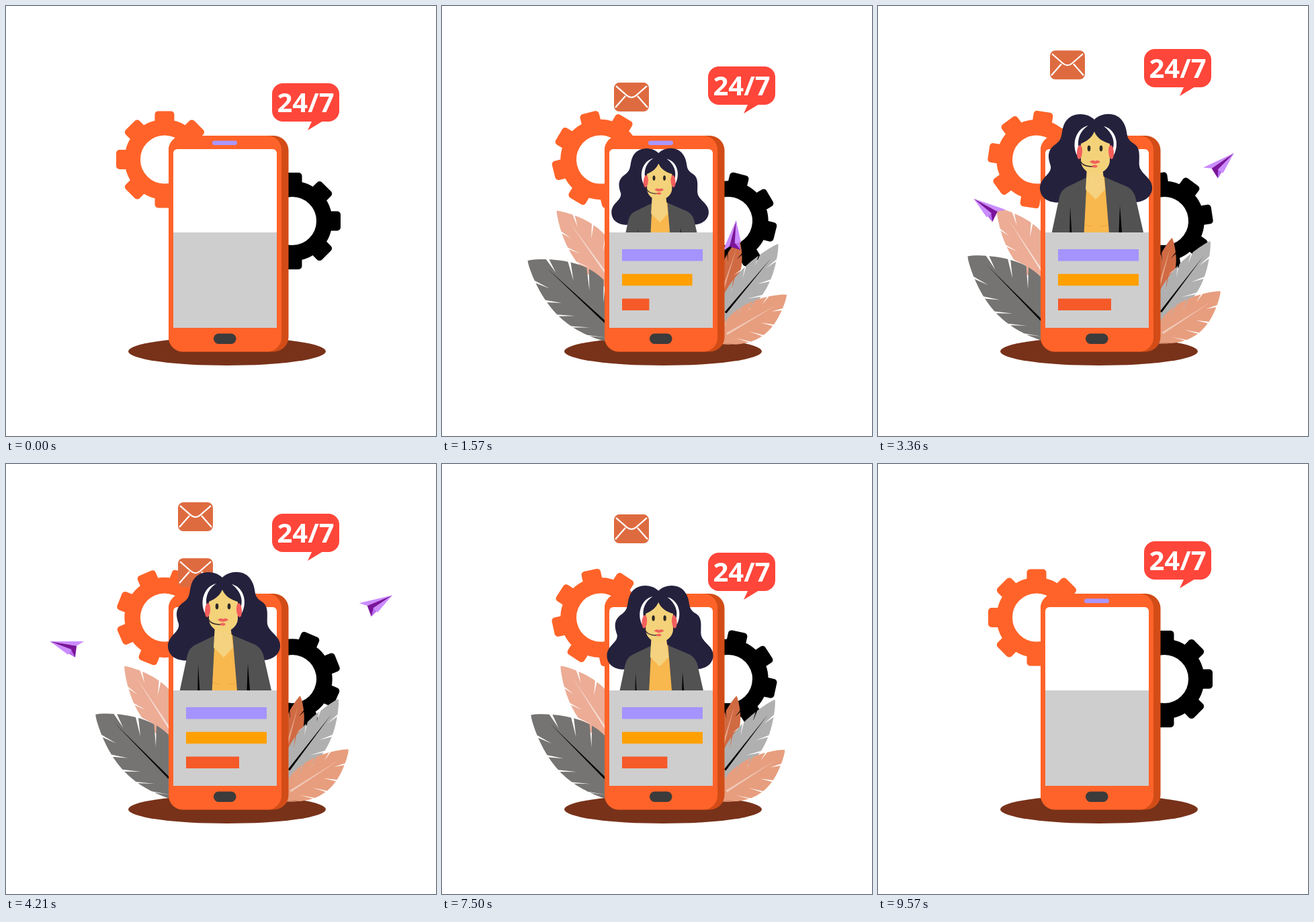
An HTML page with a canvas for the animation above (9.64 s loop, 640 px wide and 640 px high).

```html
<!DOCTYPE html>
<html lang="en">
<head>
<meta charset="utf-8">
<title>Support around the clock</title>
<style>
html, body { margin: 0; width: 100%; height: 100%; overflow: hidden; background: #fff; }
canvas { display: block; }
</style>
</head>
<body>
<canvas id="stage" width="640" height="640"></canvas>
<script>
const ctx = document.getElementById('stage').getContext('2d');
const LOOP = 9640, SPIN = 9570;
const ORANGE = '#ff6329', HAIR = '#24213d', SKIN = '#f3d27a', PINK = '#f35f5c';

const clamp = v => Math.max(0, Math.min(1, v));
const wave = u => (1 - Math.cos(Math.PI * clamp(u))) / 2;

// Smooth curve through [time, value] keys.
function track(t, keys) {
  const n = keys.length - 1;
  if (t <= keys[0][0]) return keys[0][1];
  if (t >= keys[n][0]) return keys[n][1];
  let i = 0;
  while (t > keys[i + 1][0]) i++;
  const slope = k => {
    const a = keys[Math.max(0, k - 1)], b = keys[Math.min(n, k + 1)];
    return (b[1] - a[1]) / (b[0] - a[0]);
  };
  const [t0, a] = keys[i], [t1, b] = keys[i + 1];
  const d = t1 - t0, u = (t - t0) / d, v = 1 - u;
  return v * v * (1 + 2 * u) * a + u * u * (3 - 2 * u) * b
    + u * v * d * (v * slope(i) - u * slope(i + 1));
}

function fill(color, path) {
  ctx.fillStyle = color;
  ctx.fill(typeof path === 'string' ? new Path2D(path) : path);
}
function stroke(color, width, path) {
  ctx.strokeStyle = color;
  ctx.lineWidth = width;
  ctx.stroke(new Path2D(path));
}
function box(color, x, y, w, h, r = 0) {
  const p = new Path2D();
  p.roundRect(x, y, w, h, r);
  fill(color, p);
}
function oval(color, x, y, rx, ry, turn = 0) {
  const p = new Path2D();
  p.ellipse(x, y, rx, ry, turn, 0, 7);
  fill(color, p);
}
function at(x, y, angle, draw) {
  ctx.save();
  ctx.translate(x, y);
  ctx.rotate(angle);
  draw();
  ctx.restore();
}
const rad = deg => deg * Math.PI / 180;

function gear(color, x, y, angle) {
  at(x, y, angle, () => {
    for (let i = 0; i < 8; i++) {
      box(color, -14.5, -72, 29, 20, 5);
      ctx.rotate(Math.PI / 4);
    }
    ctx.strokeStyle = color;
    ctx.lineWidth = 23.5;
    ctx.beginPath();
    ctx.arc(0, 0, 47.75, 0, 7);
    ctx.stroke();
  });
}

// Blade with slits along both edges; wide/narrow are the two half widths.
function leaf({ base, tip, wide, narrow, color, vein, ribs, off, lag = 0 }, t) {
  const time = t > 5000 ? t - lag : t;
  const turn = track(time, LEAF_TURN);
  if (turn >= 80) return;
  const dx = tip[0] - base[0], dy = tip[1] - base[1], len = Math.hypot(dx, dy);
  const inward = dx < 0 ? 1 : -1;
  at(base[0], base[1], Math.atan2(dy, dx) + inward * rad(turn), () => {
    const edge = (u, w) => [len * (1 - u), w * Math.sin(Math.PI * clamp(u)) ** 0.85];
    const p = new Path2D();
    const side = (w, shift) => {
      const slits = Array.from({ length: ribs }, (_, k) => (k + 0.8 + shift) / (ribs + 1));
      const pts = [];
      for (let u = 0; u <= 1.001; u += 0.02) {
        const hit = slits.find(s => s >= u && s < u + 0.02);
        pts.push(edge(u, w));
        if (hit) {
          const [x, y] = edge(hit + 0.04, w);
          pts.push([x - len * 0.07, y * 0.5], edge(u + 0.019, w));
        }
      }
      return pts;
    };
    const outline = [...side(wide, 0), ...side(-narrow, 0.3).reverse()];
    outline.forEach(q => p.lineTo(...q));
    p.closePath();
    fill(color, p);
    fill(vein, `M${len * 0.85} ${off} L${len * 0.2} ${off * 0.5 - 1.6} V${off * 0.5 + 1.6}Z`);
  });
}

const LEAF_TURN = [[200, 85], [600, 28], [1000, 5], [1350, -3.6], [1600, -2.2], [2050, 0],
  [7300, 0], [8000, 2], [9000, 28], [9570, 75], [9640, 85]];
const LEAVES = [
  { base: [265, 430], tip: [176, 301], wide: 36, narrow: 22, color: '#ecac95', vein: '#f6ddd4', ribs: 5, off: 5, lag: -350 },
  { base: [275, 505], tip: [133, 373], wide: 52, narrow: 33, color: '#757472', vein: '#000', ribs: 6, off: 10 },
  { base: [412, 440], tip: [438, 345], wide: 17, narrow: 12, color: '#d06a43', vein: '#e7a588', ribs: 3, off: 1 },
  { base: [400, 480], tip: [495, 350], wide: 29, narrow: 19, color: '#b0b0b0', vein: '#000', ribs: 5, off: 5 },
  { base: [400, 500], tip: [510, 425], wide: 33, narrow: 20, color: '#e79e7e', vein: '#f0c9b9', ribs: 5, off: 5 }
];

function plane(t, { x, y, pitch, start, mirror }) {
  if (t < start || t > 5150) return;
  ctx.save();
  ctx.globalAlpha = 1 - clamp((t - 4900) / 220);
  ctx.translate(track(t, x), track(t, y));
  ctx.scale(mirror, 1);
  ctx.rotate(rad(track(t, pitch)));
  fill('#cb8cff', 'M-28 -12 L21 0 L-19 -3Z');
  fill('#7a1599', 'M-19 -3 L21 0 L-21 14Z');
  fill('#b76df2', 'M-13 5 L21 0 L-21 14Z');
  fill('#cb8cff', 'M-13 4 L21 0 L-10 13Z');
  ctx.restore();
}
const PLANES = [
  { start: 1150, mirror: 1,
    x: [[1150, 428], [1570, 434], [2430, 467], [4000, 546], [4210, 556], [5000, 582]],
    y: [[1150, 385], [1570, 340], [2430, 271], [4000, 210], [4210, 205], [5000, 193]],
    pitch: [[1570, -80], [2430, -60], [3300, -40], [4210, -27], [5000, -20]] },
  { start: 1900, mirror: -1,
    x: [[1900, 255], [2430, 233.5], [3000, 190], [4000, 106], [4210, 86], [4800, 47], [5150, 45]],
    y: [[1900, 408], [2430, 365.5], [3000, 316], [4000, 274], [4210, 269], [5000, 261]],
    pitch: [[1900, -70], [2430, -60], [3000, -42], [4210, -14], [5000, -5]] }
];

function envelope(t, start) {
  const s = (t - start) / 1000;
  if (s < 0 || s > 3) return;
  ctx.save();
  ctx.globalAlpha = clamp(s / 0.4);
  ctx.translate(256, 10 + 92 * (Math.hypot(s, 0.45) - 0.45));
  box('#de6b40', 0, 0, 52, 43, 8);
  stroke('#fff', 2.2, 'M3 5 L19 19 Q26 25 33 19 L49 5 M2 37 L17 20 M50 37 L35 20');
  ctx.restore();
}

function phone() {
  box('#d24c17', 242, 193, 178.5, 321.5, 22);
  box(ORANGE, 242, 193, 168, 321.5, 21);
  box('#a996ff', 307, 200.5, 37, 6.5, 3);
  box('#fff', 249, 213, 154, 130, [6, 6, 0, 0]);
  box('#cecece', 249, 337, 154, 142);
  box('#3b3b3b', 309, 487.5, 33.5, 15.5, 7.5);
}

const BAR_GROW = [[0, 0], [300, 0.51], [500, 0.87], [700, 1], [1000, 1.11], [1160, 1.1],
  [1360, 1.05], [1560, 1.02], [1900, 1]];
function bar(t, color, y, width, start, end) {
  const w = width * track(t - start, BAR_GROW) * (1 - wave((t - end) / 1000));
  if (w > 0) box(color, 268, y, w, 17.5);
}

function agent(t) {
  const scale = t < 5000
    ? 1 - (1 - clamp((t - 230) / 2750)) ** 3
    : 1 - clamp((t - 6467) / 2750) ** 3;
  if (scale < 0.5) return;
  ctx.save();
  ctx.beginPath();
  ctx.rect(0, 0, 640, 337);
  ctx.clip();
  ctx.translate(325, 540);
  ctx.scale(scale, scale);
  ctx.translate(-325, -540);

  fill(HAIR, `M322 169 C311 158 287 157 278 174 C271 188 277 197 264 206
    C251 215 253 226 257 238 C259 250 243 254 241 269 C240 289 260 297 284 290
    L325 278 L352 285 C368 296 404 297 408 273 C410 256 391 251 389 238
    C388 226 392 212 381 205 C366 196 374 188 365 173 C356 157 333 158 322 169Z`);
  fill('#525252', `M311 255 L282 269 Q273 273 270 284 L256 350 H398 L383 284
    Q380 274 371 269 L338 255Z`);
  fill('#f9b84e', 'M311 254 L306 350 H345 L337 254Z');
  fill('#f5d27f', 'M311 240 H334 L338 273 L324 288 L309 273Z');
  stroke('#efa93f', 1.2, 'M308 325 Q314 329 320 327 M331 327 Q337 329 342 325');
  fill('#000', 'M286 298 L289 350 H285Z M360 297 L364 350 H358Z');

  fill(SKIN, `M322 187 C316 200 307 202 302 205 L302 230 C302 242 313 250 323 250
    C334 250 345 241 345 230 L345 205 C335 202 326 197 322 187Z`);
  oval('#2d2926', 314, 212, 2.3, 4.4);
  oval('#2d2926', 332, 212, 2.3, 4.4);
  fill('#ef625b', 'M315 232 Q320 228 323 231 Q327 228 331 232 Q323 238 315 232Z');

  fill('#fff', 'M296 222 C287 202 297 181 313 178 C300 186 295 201 300 215Z');
  fill('#fff', 'M351 222 C361 202 351 182 336 179 C348 188 354 201 349 215Z');
  oval(PINK, 300, 217.5, 4, 10.5, 0.08);
  oval(PINK, 347, 217.5, 4, 10.5, -0.08);
  stroke('#30272c', 1.4, 'M300 228 Q303 239 319 239');
  oval('#ef625b', 322.5, 238.5, 4, 2);
  ctx.restore();
}

function bubble(t) {
  const y = t < 3360
    ? 115 - 51 * wave(t / 3180)
    : t < 6427
      ? 64 + 74 * wave((t - 3540) / 2800)
      : 138 - 23 * wave((t - 6427) / (SPIN - 6427));
  at(0, y, 0, () => {
    box('#ff463a', 396, 0, 100, 57, 16);
    fill('#ff463a', 'M456 55 L449 70 L472 56Z');
    ctx.fillStyle = '#fff';
    ctx.font = '700 40px "Open Sans", sans-serif';
    ctx.textAlign = 'center';
    ctx.fillText('24/7', 446, 43);
  });
}

function draw(t) {
  ctx.fillStyle = '#fff';
  ctx.fillRect(0, 0, 640, 640);
  const spin = 2 * Math.PI * clamp(t / SPIN);
  oval('#78321a', 329, 514, 147, 21);
  gear(ORANGE, 236, 228.5, -spin);
  gear('#000', 426, 320, spin);
  LEAVES.forEach(l => leaf(l, t));
  PLANES.forEach(p => plane(t, p));
  [55, 2400, 3361, 6435].forEach(s => envelope(t, s));
  phone();
  bar(t, '#a593ff', 362, 120, 870, 7750);
  bar(t, '#ffa000', 398.7, 120, 1070, 7500);
  bar(t, '#f55a28', 435.5, 79, 1270, 7250);
  agent(t);
  bubble(t);
}

const begin = performance.now();
function frame() {
  draw((performance.now() - begin) % LOOP);
  requestAnimationFrame(frame);
}
frame();
</script>
</body>
</html>
```
